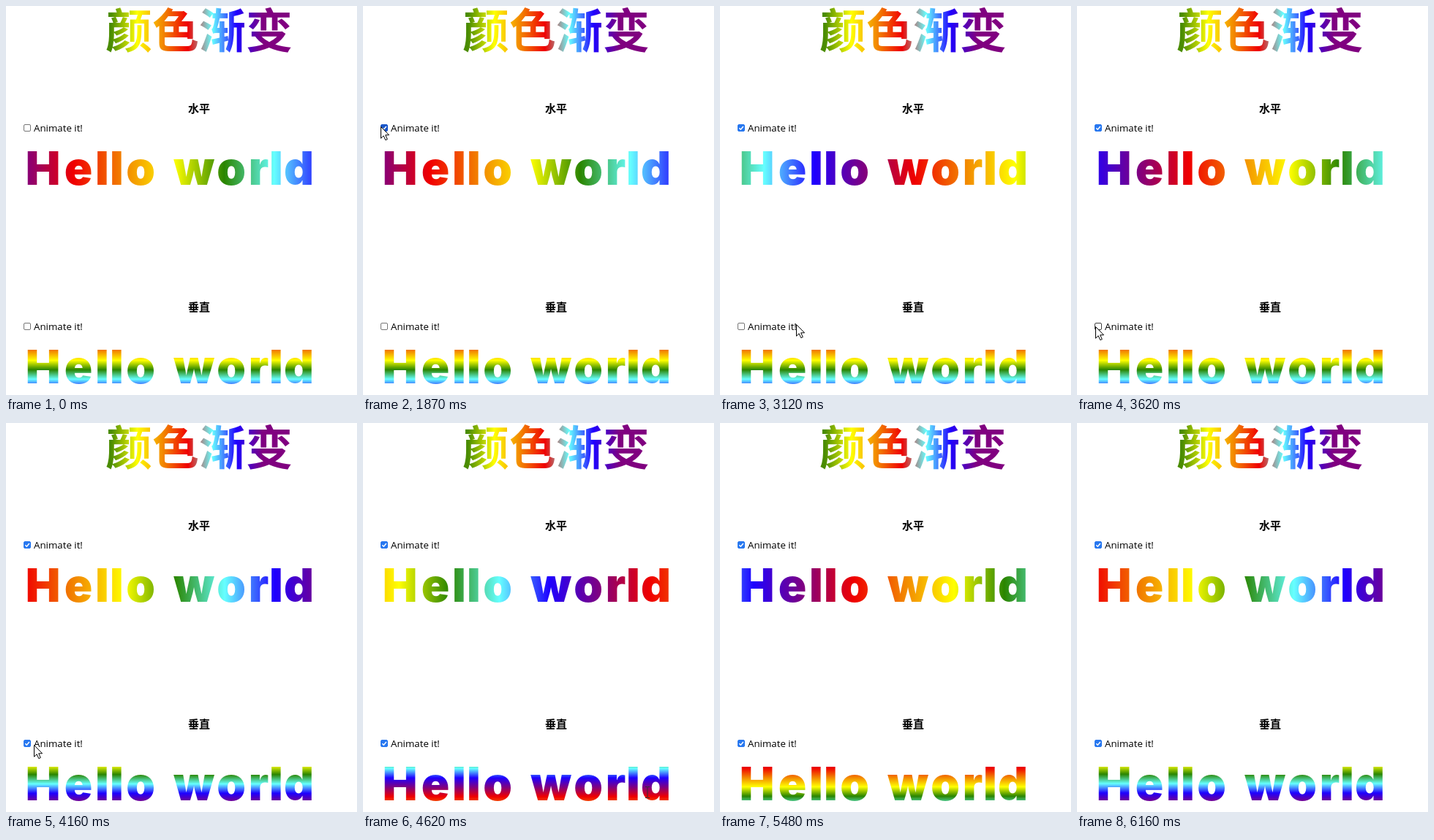
Recreate the animation shown at these times as an HTML page. Size 480 by 533 pixels, loop 6260 ms.

```html
<!DOCTYPE html>
<html lang="zh">
<head>
<meta charset="utf-8">
<title>颜色渐变</title>
<style>
  html, body { margin: 0; width: 100%; height: 100%; overflow: hidden; background: #fff; }
  svg { display: block; }
  .cjk { font-family: "Noto Sans CJK SC", "Noto Sans CJK", sans-serif; font-weight: 700; text-anchor: middle; }
  .title { font-size: 64px; fill: url(#titleFill); }
  .head { font-size: 15px; }
  .label { font: 13.3px "Open Sans", "Noto Sans", sans-serif; }
  .hello { font: 900 63.5px Inter, "Liberation Sans", sans-serif; text-anchor: middle; }
  .box { fill: #fff; stroke: #767676; }
  .box.hover { stroke: #404040; }
  .tick { fill: none; stroke: none; stroke-width: 1.5; }
  .checked .box { fill: #2878f0; stroke: #2878f0; }
  .checked .box.hover { fill: #1a56c8; stroke: #1a56c8; }
  .checked .tick { stroke: #fff; }
</style>
</head>
<body>
<svg width="480" height="533" viewBox="0 0 480 533">
  <defs>
    <linearGradient id="titleFill" gradientUnits="userSpaceOnUse" x1="136" x2="392" y1="0" y2="0">
      <stop offset=".03" stop-color="#4a8c00"/>
      <stop offset=".17" stop-color="#ffff00"/>
      <stop offset=".31" stop-color="#f28500"/>
      <stop offset=".44" stop-color="#f00000"/>
      <stop offset=".57" stop-color="#66ffff"/>
      <stop offset=".7" stop-color="#1e00ff"/>
      <stop offset=".84" stop-color="#800080"/>
    </linearGradient>
    <linearGradient id="across" gradientUnits="userSpaceOnUse" spreadMethod="repeat" x1="24" x2="504" y1="0" y2="0"/>
    <linearGradient id="down" gradientUnits="userSpaceOnUse" spreadMethod="repeat" x1="0" x2="0" y1="447" y2="537"/>
  </defs>

  <text class="cjk title" x="264" y="57">颜色渐变</text>
  <g id="horizontal">
    <text class="cjk head" x="264" y="146">水平</text>
    <rect class="box" x="24.5" y="162.5" width="9" height="9" rx="1.5"/>
    <path class="tick" d="M26.3 167.2l2 2 3.6-4.3"/>
    <text class="label" x="38" y="172">Animate it!</text>
    <text class="hello" fill="url(#across)" y="245"></text>
  </g>
  <g id="vertical">
    <text class="cjk head" x="264" y="418">垂直</text>
    <rect class="box" x="24.5" y="434.5" width="9" height="9" rx="1.5"/>
    <path class="tick" d="M26.3 439.2l2 2 3.6-4.3"/>
    <text class="label" x="38" y="444">Animate it!</text>
    <text class="hello" fill="url(#down)" y="517"></text>
  </g>

  <g id="cursor">
    <path id="arrow" fill="#fff" stroke="#000" stroke-linejoin="round"
      d="M.5 .5v15.8l3.6-3.5 2.7 5.9 2.5-1.1-2.6-5.8h4.9z"/>
    <path id="beam" fill="none" stroke="#333" d="M-3 -7.5h2.5l.5 .5 .5-.5h2.5M0 -7v14M-3 7.5h2.5l.5-.5 .5 .5h2.5"/>
  </g>
</svg>
<script>
const LOOP = 6260, FIRST = 170, STEP = 67;
const PERIOD = 2000;
const rainbow = ["#800080", "#f00000", "#f28500", "#ffff00", "#2a8500", "#66ffff", "#1e00ff", "#800080"];
const $ = id => document.getElementById(id);

for (const id of ["across", "down"]) {
  $(id).innerHTML = rainbow.map((color, i) =>
    `<stop offset="${i / (rainbow.length - 1)}" stop-color="${color}"/>`).join("");
}

// Centre of each letter, so the wide spacing holds with any heavy face.
const centres = [50.5, 99, 131.5, 151.5, 184, 216, 257, 308, 345.5, 369.5, 400.5];
for (const text of document.querySelectorAll(".hello")) {
  text.setAttribute("x", centres.join(" "));
  text.textContent = "Hello world";
}

const demos = [
  { id: "horizontal", fill: "across", start: 1840, dx: -480, dy: 0, boxY: 162 },
  { id: "vertical", fill: "down", start: 3750, dx: 0, dy: -90, boxY: 434 }
].map(demo => ({ ...demo, group: $(demo.id), box: $(demo.id).querySelector(".box") }));

// time, x, y of the pointer
const path = [
  [170, 367, 486], [370, 285, 370], [580, 165, 220], [790, 77, 147], [1000, 58, 162],
  [1300, 28, 167], [1440, 24, 165], [1980, 24, 165], [2140, 45, 180], [2290, 99, 252],
  [2410, 130, 315], [2480, 136, 346], [2550, 133, 369], [2700, 138, 378], [2870, 128, 405],
  [3080, 112, 434], [3300, 65, 445], [3500, 28, 441], [3620, 24, 438], [4090, 24, 438],
  [4290, 110, 455], [4360, 160, 463], [4430, 222, 460], [4500, 283, 468], [4620, 421, 518]
];

function pointerAt(t) {
  const next = path.findIndex(p => p[0] > t);
  if (next < 1) return path[path.length - 1].slice(1);
  const a = path[next - 1], b = path[next];
  const k = (t - a[0]) / (b[0] - a[0]);
  return [a[1] + (b[1] - a[1]) * k, a[2] + (b[2] - a[2]) * k];
}

const overText = (x, y) => x > 24 && x < 423 && (y > 174 && y < 264 || y > 447);

function draw(now) {
  const raw = now % LOOP;
  const t = raw < FIRST ? 0 : FIRST + Math.floor((raw - FIRST + 2) / STEP) * STEP;
  const visible = t >= FIRST && t < 4680;
  const [x, y] = pointerAt(t);
  const beam = overText(x, y);

  $("cursor").style.display = visible ? "" : "none";
  $("cursor").setAttribute("transform", `translate(${Math.round(x)} ${Math.round(y)})`);
  $("beam").style.display = beam ? "" : "none";
  $("arrow").style.display = beam ? "none" : "";

  for (const { fill, start, dx, dy, boxY, group, box } of demos) {
    const turns = Math.max(0, t - start) / PERIOD;
    $(fill).setAttribute("gradientTransform", `translate(${dx * turns} ${dy * turns})`);
    group.classList.toggle("checked", t >= start);
    box.classList.toggle("hover", visible && x >= 23 && x < 35 && y >= boxY && y < boxY + 11);
  }
}

const began = performance.now();
(function tick() {
  draw(performance.now() - began);
  requestAnimationFrame(tick);
})();
</script>
</body>
</html>
```
